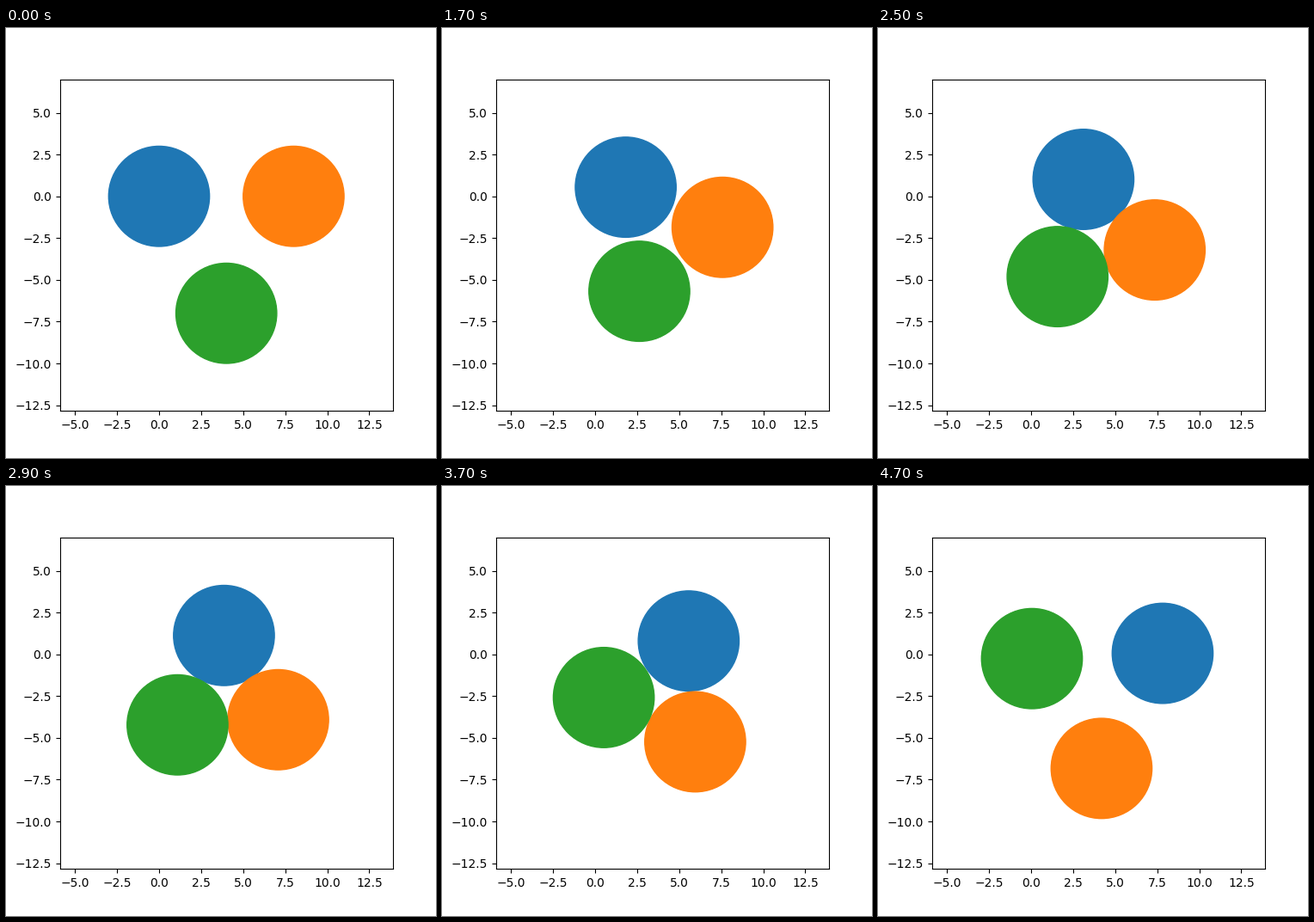
Animation, 500 px wide and 500 px high, one loop 4900 ms. Source, as a matplotlib script:

```python
import numpy as np
import matplotlib.pyplot as plt
from matplotlib.animation import FuncAnimation

TICK = 100          # ms per animation frame
HOLD = 5            # ticks the starting pose stays
STEP = 2            # ticks per later pose
POSES = 23

RADIUS = 3
ROLL = 2 * RADIUS / np.sqrt(3)      # distance from the centre when all discs touch
CORNERS = np.array([0, 8, 4 - 7j])  # start places, clockwise
CENTRE = CORNERS.mean()
KICK_R, KICK_TURN = 4.11, np.radians(6.4)   # where the first short move ends


def polar(r, angle):
    return r * np.exp(1j * angle)


def distance_travelled():
    """Slow start, steady acceleration, then constant speed on the way out."""
    step = np.arange(POSES - 1)
    speed = np.select([step < 3, step < 15], [0.239, 0.2815 + 0.0113 * (step - 3)], 0.475)
    return np.append(0, np.cumsum(speed))


def disc_track(start, goal):
    """Move in on a tangent, roll clockwise around the centre, leave on a tangent."""
    a, b = start - CENTRE, goal - CENTRE
    kick_angle = np.angle(a) - KICK_TURN
    roll_in = kick_angle - np.arccos(ROLL / KICK_R)
    roll_out = np.angle(b) + np.arccos(ROLL / abs(b))
    sweep = (roll_in - roll_out) % (2 * np.pi)
    arc = polar(ROLL, roll_in - np.linspace(0, sweep, 60))
    path = np.concatenate([[a, polar(KICK_R, kick_angle)], arc, [b]])
    length = np.append(0, np.cumsum(abs(np.diff(path))))
    return CENTRE + np.interp(distance_travelled(), length, path)


fig, ax = plt.subplots(figsize=(5, 5), dpi=100)
ax.set_xticks(np.arange(-5, 13, 2.5))
ax.set_yticks(np.arange(-12.5, 6, 2.5))
ax.set_xlim(-5.905, 13.91)
ax.set_ylim(-12.83, 6.985)

tracks = [disc_track(start, goal) for start, goal in zip(CORNERS, np.roll(CORNERS, -1))]
discs = [ax.add_patch(plt.Circle((c.real, c.imag), RADIUS, color=color))
         for c, color in zip(CORNERS, ["tab:blue", "tab:orange", "tab:green"])]


def update(tick):
    pose = 0 if tick < HOLD else (tick - HOLD) // STEP + 1
    for disc, track in zip(discs, tracks):
        disc.center = track[pose].real, track[pose].imag
    return discs


anim = FuncAnimation(fig, update, frames=HOLD + STEP * (POSES - 1), interval=TICK,
                     init_func=lambda: update(0), repeat=True, repeat_delay=0)
plt.show()
```
